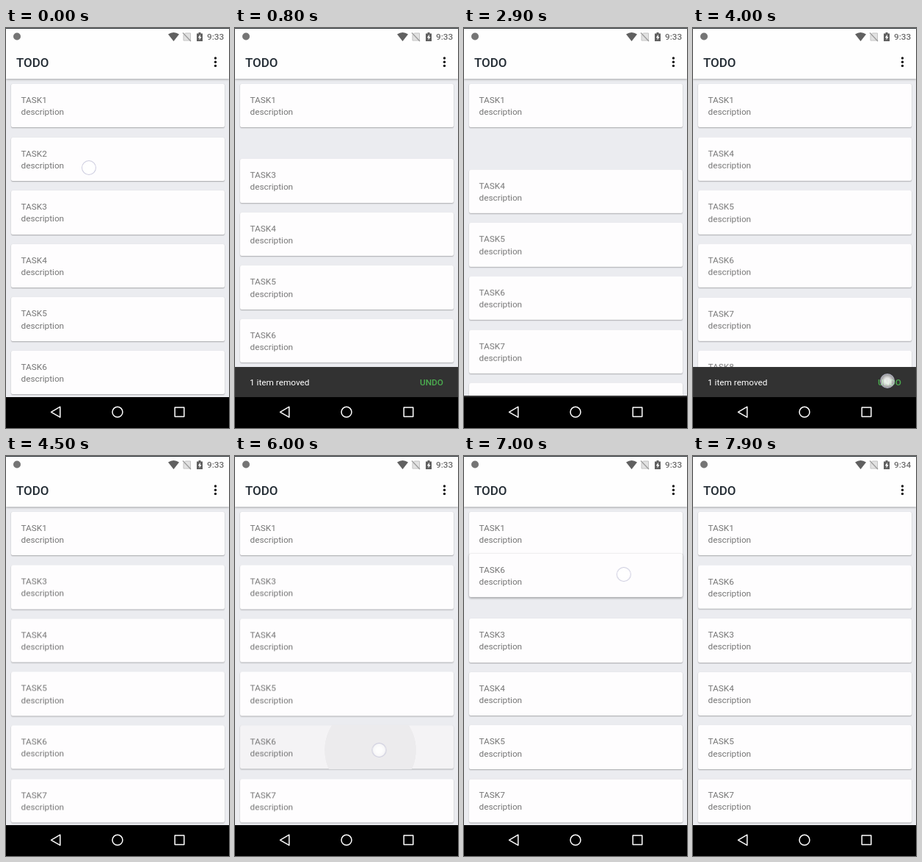
These frames come from a looping animation (304 px wide and 544 px high, 8000 ms). An HTML page:

```html
<!DOCTYPE html>
<html lang="en">
<head>
<meta charset="utf-8">
<title>Todo list</title>
<style>
  html, body { margin: 0; width: 100%; height: 100%; overflow: hidden; }
  .stage {
    --pitch: 72.6px;
    --smooth: cubic-bezier(.37, 0, .63, 1);
    --slide: cubic-bezier(.4, 0, .2, 1);
    position: relative; width: 304px; height: 544px; overflow: hidden;
    background: #ebecf0; color: #757575;
    font: 11.8px/16.2px Roboto, sans-serif;
  }
  .stage * { position: absolute; box-sizing: border-box; }
  .stage svg, .stage svg * { position: static; }
  .stage svg { position: absolute; left: 0; top: 0; }
  [class*="anim-"] { animation: 8s linear infinite; }

  .top {
    left: 0; top: 0; width: 304px; height: 69px; background: #fefefe;
    border-top: 1px solid #2b3236; box-shadow: 0 1px 3px rgba(0, 0, 0, .3);
  }
  .title { left: 14px; top: 35px; font: 500 16.9px/22px Roboto, sans-serif; color: #222b33; }
  .clock { left: 274px; top: 3px; font-weight: 500; color: #6b6b6b; }

  .card {
    left: 7px; top: calc(76px + var(--slot) * var(--pitch));
    width: 290.5px; height: 59.4px; padding: 14px 13.5px; overflow: hidden;
    border-radius: 2px; background: #fefdfe;
    box-shadow: 0 1px 1.5px rgba(0, 0, 0, .28), 0 0 1px rgba(0, 0, 0, .12);
  }
  .card p { position: relative; margin: 0; }
  .ripple {
    left: 116px; top: -28px; width: 123px; height: 123px;
    border-radius: 50%; background: #ecebed; opacity: 0;
  }

  .snack {
    left: 0; top: 461px; width: 304px; height: 41px;
    background: #323232; color: #fff; line-height: 42px;
  }
  .snack span { left: 20px; white-space: nowrap; }
  .snack b { left: 252px; font-weight: 500; color: #4caf50; }
  .nav { left: 0; top: 501.5px; width: 304px; height: 43px; background: #000; }

  .touch {
    left: -10px; top: -10px; width: 20px; height: 20px; border-radius: 50%;
    border: 1.5px solid rgba(188, 188, 212, .75);
    background: radial-gradient(rgba(255, 255, 255, .88) 30%, rgba(255, 255, 255, .5) 70%);
  }

  .anim-swipe { animation-name: swipe; }
  @keyframes swipe {
    0%, 1% { transform: none; }
    5% { transform: translateX(145px); }
    7.2%, 100% { transform: translateX(304px); }
  }

  .anim-third { animation-name: third, press; }
  @keyframes third {
    0% { transform: none; opacity: 1; }
    8.94% { transform: none; animation-timing-function: var(--smooth); }
    12.06%, 26.3% { transform: translate(0, calc(-1 * var(--pitch))); }
    30.5% { transform: translate(140px, calc(-1 * var(--pitch))); }
    33.5% { transform: translate(304px, calc(-1 * var(--pitch))); opacity: 1; }
    33.6% { transform: translate(304px, calc(-1 * var(--pitch))); opacity: 0; }
    54.38% { transform: translate(0, calc(-1 * var(--pitch))); opacity: 0; }
    55.9% { transform: translate(0, calc(-1 * var(--pitch))); opacity: 1; }
    84.5% { transform: translate(0, calc(-1 * var(--pitch))); animation-timing-function: var(--smooth); }
    87.63%, 100% { transform: none; opacity: 1; }
  }
  @keyframes press {
    0%, 25.8% { background: #fefdfe; }
    26%, 33% { background: #f1f0f2; }
    34%, 100% { background: #fefdfe; }
  }

  /* Rows below the removed ones close up twice, then open again on undo. */
  .anim-shift { animation-name: shift; }
  @keyframes shift {
    0% { transform: none; }
    8.94% { transform: none; animation-timing-function: var(--smooth); }
    12.06% { transform: translateY(calc(-1 * var(--pitch))); }
    35.5% { transform: translateY(calc(-1 * var(--pitch))); animation-timing-function: var(--smooth); }
    38.63% { transform: translateY(calc(-2 * var(--pitch))); }
    51.25% { transform: translateY(calc(-2 * var(--pitch))); animation-timing-function: var(--smooth); }
    54.38%, 100% { transform: translateY(calc(-1 * var(--pitch))); }
  }

  .anim-fourth { animation-name: fourth; }
  @keyframes fourth {
    0% { transform: none; }
    81.44% { transform: none; animation-timing-function: var(--smooth); }
    84.56%, 100% { transform: translateY(var(--pitch)); }
  }
  .anim-fifth { animation-name: fifth; }
  @keyframes fifth {
    0% { transform: none; }
    79.25% { transform: none; animation-timing-function: var(--smooth); }
    82.38%, 100% { transform: translateY(var(--pitch)); }
  }

  .anim-drag { animation-name: drag, hold, lift; }
  @keyframes drag {
    0%, 76.88% { transform: none; }
    79.25% { transform: translateY(-72.4px); }
    81.44% { transform: translateY(-145px); }
    82.5% { transform: translateY(-178px); }
    83.75% { transform: translateY(-206px); }
    85% { transform: translateY(-225.5px); }
    88.13% { transform: translateY(-235.5px); }
    91.25% { transform: translateY(-235.5px); animation-timing-function: var(--smooth); }
    94.38%, 100% { transform: translateY(-217.8px); }
  }
  @keyframes hold {
    0%, 74.5% { background: #fefdfe; }
    74.8%, 77% { background: #f4f3f5; }
    79%, 100% { background: #fefdfe; }
  }
  @keyframes lift {
    0%, 76.5%, 94.4%, 100% { box-shadow: 0 1px 1.5px rgba(0, 0, 0, .28), 0 0 1px rgba(0, 0, 0, .12); }
    78%, 91.25% { box-shadow: 0 1.5px 3px rgba(0, 0, 0, .33), 0 0 2px rgba(0, 0, 0, .15); }
  }
  .anim-ripple { animation-name: ripple; }
  @keyframes ripple {
    0%, 74.3% { transform: scale(.3); opacity: 0; }
    74.5% { transform: scale(.5); opacity: 1; }
    75% { transform: none; opacity: 1; }
    77% { transform: scale(3.2); opacity: 1; }
    78.5%, 100% { transform: scale(3.2); opacity: 0; }
  }

  .anim-snack { animation-name: snack; }
  @keyframes snack {
    0% { transform: translateY(41px); }
    6.9% { transform: translateY(41px); animation-timing-function: var(--slide); }
    9.9% { transform: none; }
    34% { transform: none; animation-timing-function: var(--slide); }
    37.13% { transform: translateY(41px); animation-timing-function: var(--slide); }
    40% { transform: none; }
    51.5% { transform: none; animation-timing-function: var(--slide); }
    54.63%, 100% { transform: translateY(41px); }
  }

  .anim-touch { animation-name: touch; }
  @keyframes touch {
    0%, 1% { transform: translate(113px, 190px); opacity: 1; }
    5% { transform: translate(270px, 188px); opacity: 1; }
    5.6% { transform: translate(290px, 188px); opacity: 0; }
    19.4% { transform: translate(124px, 187px); opacity: 0; }
    19.6%, 25.2% { transform: translate(124px, 187px); opacity: 1; }
    26%, 26.3% { transform: translate(135px, 188px); }
    30.5% { transform: translate(285px, 188px); opacity: 1; }
    31.2% { transform: translate(300px, 188px); opacity: 0; }
    49.6% { transform: translate(265px, 480px); opacity: 0; }
    49.75%, 51% { transform: translate(265px, 480px); opacity: 1; }
    52% { transform: translate(265px, 480px); opacity: 0; }
    63.4% { transform: translate(200px, 401px); opacity: 0; }
    63.6%, 65.5% { transform: translate(200px, 401px); opacity: 1; }
    67.3%, 72% { transform: translate(198.5px, 401px); }
    72.4% { transform: translate(198px, 402px); }
    74.9%, 76.88% { transform: translate(196.5px, 400px); }
    79.25% { transform: translate(204px, 321px); }
    81.44% { transform: translate(211px, 249px); }
    82.5% { transform: translate(215px, 216px); }
    83.75% { transform: translate(216px, 188px); }
    85% { transform: translate(217px, 169px); }
    88.13%, 91% { transform: translate(218px, 159px); opacity: 1; }
    92.5% { transform: translate(218px, 159px); opacity: 0; }
    100% { transform: translate(113px, 190px); opacity: 0; }
  }

  .anim-before { animation-name: before; }
  .anim-after { animation-name: after; }
  .anim-before, .anim-after { animation-timing-function: step-end; }
  @keyframes before { 0% { opacity: 1; } 98.6%, 100% { opacity: 0; } }
  @keyframes after { 0% { opacity: 0; } 98.6%, 100% { opacity: 1; } }
</style>
</head>
<body>
<div class="stage">
  <div class="card" style="--slot:0"><p>TASK1</p><p>description</p></div>
  <div class="card anim-swipe" style="--slot:1"><p>TASK2</p><p>description</p></div>
  <div class="card anim-third" style="--slot:2"><p>TASK3</p><p>description</p></div>
  <div class="anim-shift">
    <div class="card anim-fourth" style="--slot:3"><p>TASK4</p><p>description</p></div>
    <div class="card anim-fifth" style="--slot:4"><p>TASK5</p><p>description</p></div>
    <div class="card" style="--slot:6"><p>TASK7</p><p>description</p></div>
    <div class="card" style="--slot:7"><p>TASK8</p><p>description</p></div>
    <div class="card anim-drag" style="--slot:5">
      <i class="ripple anim-ripple"></i><p>TASK6</p><p>description</p>
    </div>
  </div>

  <div class="top">
    <div class="title">TODO</div>
    <div class="clock anim-before">9:33</div>
    <div class="clock anim-after">9:34</div>
  </div>
  <svg width="304" height="69">
    <circle cx="15" cy="11.5" r="5" fill="#757575"/>
    <path d="M221 8.6Q228.5 3.4 236 8.6L228.5 18Z" fill="#606060"/>
    <path d="M244.5 7H251.5V17H242V9.5Z" fill="#e2e2e2" stroke="#c4c4c4"/>
    <path d="M241 6.5L252 18" stroke="#9a9a9a" stroke-width="1.2"/>
    <path d="M260 7.5H262.5V6H265.5V7.5H268V18H260Z" fill="#606060"/>
    <path d="M264.8 8.8L261.8 13.2H263.6V16.4L266.4 12H264.8Z" fill="#fff"/>
    <g fill="#111">
      <circle cx="285.5" cy="41" r="1.7"/>
      <circle cx="285.5" cy="46.2" r="1.7"/>
      <circle cx="285.5" cy="51.4" r="1.7"/>
    </g>
  </svg>

  <div class="snack anim-snack"><span>1 item removed</span><b>UNDO</b></div>
  <div class="nav">
    <svg width="304" height="43" fill="none" stroke="#fff" stroke-width="1.5" stroke-linejoin="round">
      <path d="M61.5 20.3L73.8 13.2V27.4Z"/>
      <circle cx="152" cy="20.3" r="7"/>
      <rect x="230.2" y="14" width="12.6" height="12.6"/>
    </svg>
  </div>
  <div class="touch anim-touch"></div>
</div>
</body>
</html>
```
